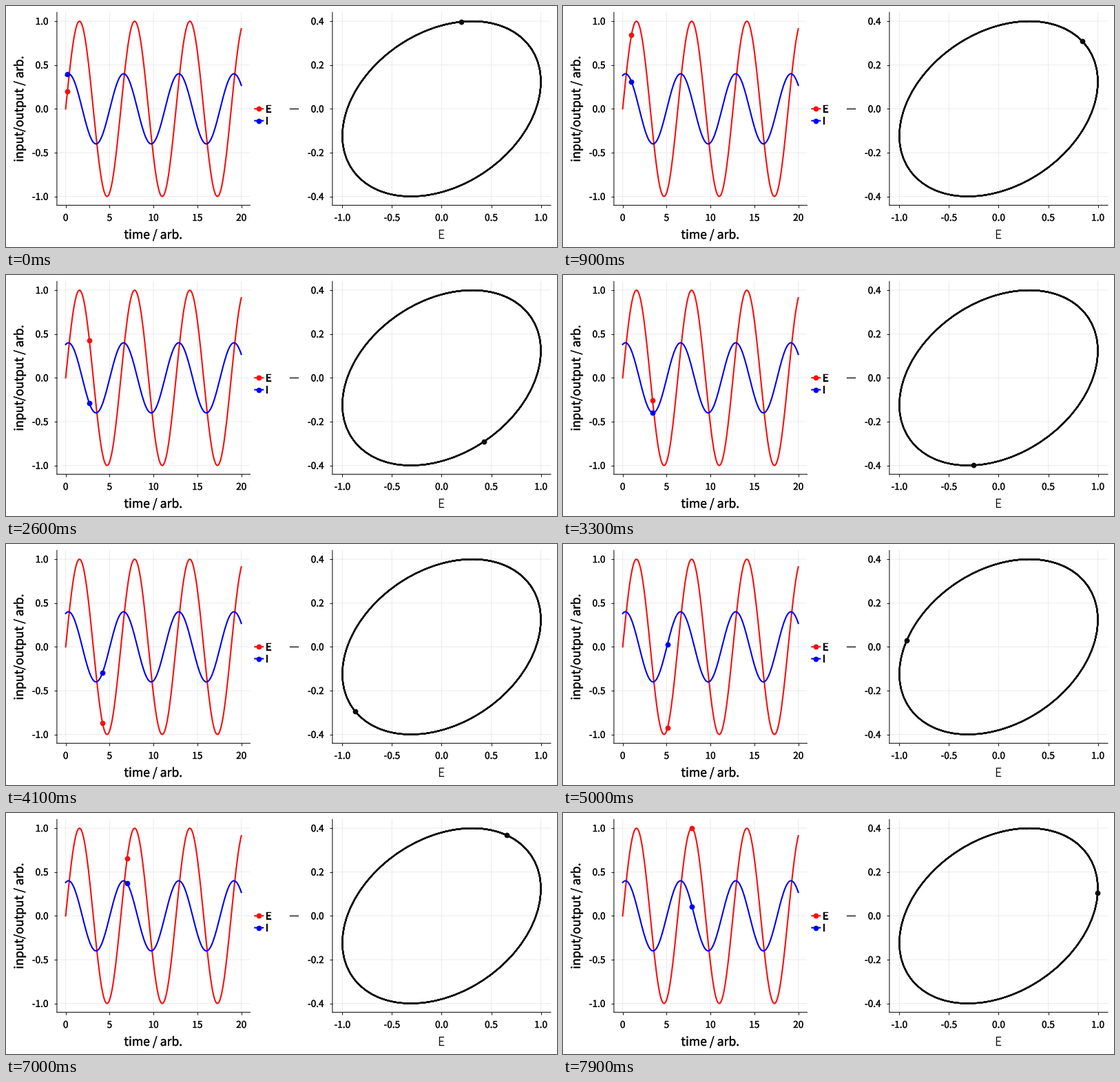
These frames come from a looping animation (800 by 350 pixels, 8000 ms). A matplotlib script:

```python
import numpy as np
import matplotlib.pyplot as plt
from matplotlib.animation import FuncAnimation
from matplotlib.lines import Line2D
from matplotlib.patheffects import withStroke

W, H, DPI = 800, 350, 100
PT = 72 / DPI  # points per pixel
RED, BLUE, BLACK = "#f80f0f", "#0000f5", "#0c0c0c"
FRAMES, HOLD = 80, 66
PHASE = 0.4 * np.pi

plt.rcParams["font.family"] = "Noto Sans CJK JP"
plt.rcParams["path.snap"] = False
fig = plt.figure(figsize=(W / DPI, H / DPI), dpi=DPI, facecolor="white")


def signal_e(t):
    return np.sin(t)


def signal_i(t):
    return 0.4 * np.sin(t + PHASE)


def label(x, y, text, size, ha="center", rotation=0):
    # a hairline stroke gives the medium weight
    fig.text(x / W, 1 - y / H, text, fontsize=size * PT, color=BLACK, ha=ha,
             va="baseline", rotation=rotation, rotation_mode="anchor",
             path_effects=[withStroke(linewidth=0.35 * PT, foreground=BLACK)])


def panel(left, right, xlim, ylim, xticks, yticks, xfmt):
    top, bottom = 9.3, 289.4
    ax = fig.add_axes([left / W, 1 - bottom / H,
                       (right - left) / W, (bottom - top) / H])
    ax.set(xlim=xlim, ylim=ylim, xticks=xticks, yticks=yticks)
    ax.set_axisbelow(True)
    ax.grid(color="#ebebeb", lw=1 * PT)
    ax.spines[["top", "right"]].set_visible(False)
    ax.spines[["left", "bottom"]].set(linewidth=1.1 * PT, color="#1a1a1a")
    ax.tick_params(length=4 * PT, width=1.1 * PT, color="#1a1a1a",
                   labelbottom=False, labelleft=False)
    for v in xticks:
        x = left + (v - xlim[0]) / (xlim[1] - xlim[0]) * (right - left)
        label(x, 312, format(v, xfmt), 13.6)
    for v in yticks:
        y = bottom - (v - ylim[0]) / (ylim[1] - ylim[0]) * (bottom - top)
        label(left - 12.4, y + 5, f"{v:.1f}", 13.6, ha="right")
    return ax


def dot(ax, color):
    return ax.plot([], [], "o", color=color, ms=7.8 * PT, mew=0, zorder=5)[0]


waves = panel(73.9, 354.4, (-1, 21), (-1.1, 1.1),
              [0, 5, 10, 15, 20], [-1, -0.5, 0, 0.5, 1], "d")
orbit = panel(473.9, 791.0, (-1.1, 1.1), (-0.44, 0.44),
              [-1, -0.5, 0, 0.5, 1], [-0.4, -0.2, 0, 0.2, 0.4], ".1f")

label(213.8, 338, "time / arb.", 17.6)
label(632, 338, "E", 17.6)
label(25, 149.5, "input/output / arb.", 17.6, rotation=90)
label(425, 149.5, "I", 17.6, rotation=90)

time = np.linspace(0, 20, 201)
for fn, color in ((signal_e, RED), (signal_i, BLUE)):
    waves.plot(time, fn(time), color=color, lw=2.1 * PT)
orbit.plot(signal_e(time), signal_i(time), color=BLACK, lw=2.2 * PT)

for y, name, color in ((149.3, "E", RED), (166.6, "I", BLUE)):
    fig.add_artist(Line2D([360.3 / W, 367.3 / W, 374.3 / W], [1 - y / H] * 3,
                          color=color, lw=2.1 * PT, marker="o",
                          ms=7.8 * PT, mew=0, markevery=[1],
                          solid_capstyle="butt"))
    label(377, y + 5.3, name, 14.4, ha="left")

dot_e, dot_i, dot_orbit = dot(waves, RED), dot(waves, BLUE), dot(orbit, BLACK)


def update(frame):
    # the clock rests for one extra step at the start and at HOLD
    t = 0.1 * (max(frame, 1) + (frame < HOLD))
    e, i = signal_e(t), signal_i(t)
    dot_e.set_data([t], [e])
    dot_i.set_data([t], [i])
    dot_orbit.set_data([e], [i])
    return dot_e, dot_i, dot_orbit


anim = FuncAnimation(fig, update, frames=FRAMES, interval=100,
                     repeat=True, repeat_delay=0, blit=False)
plt.show()
```
